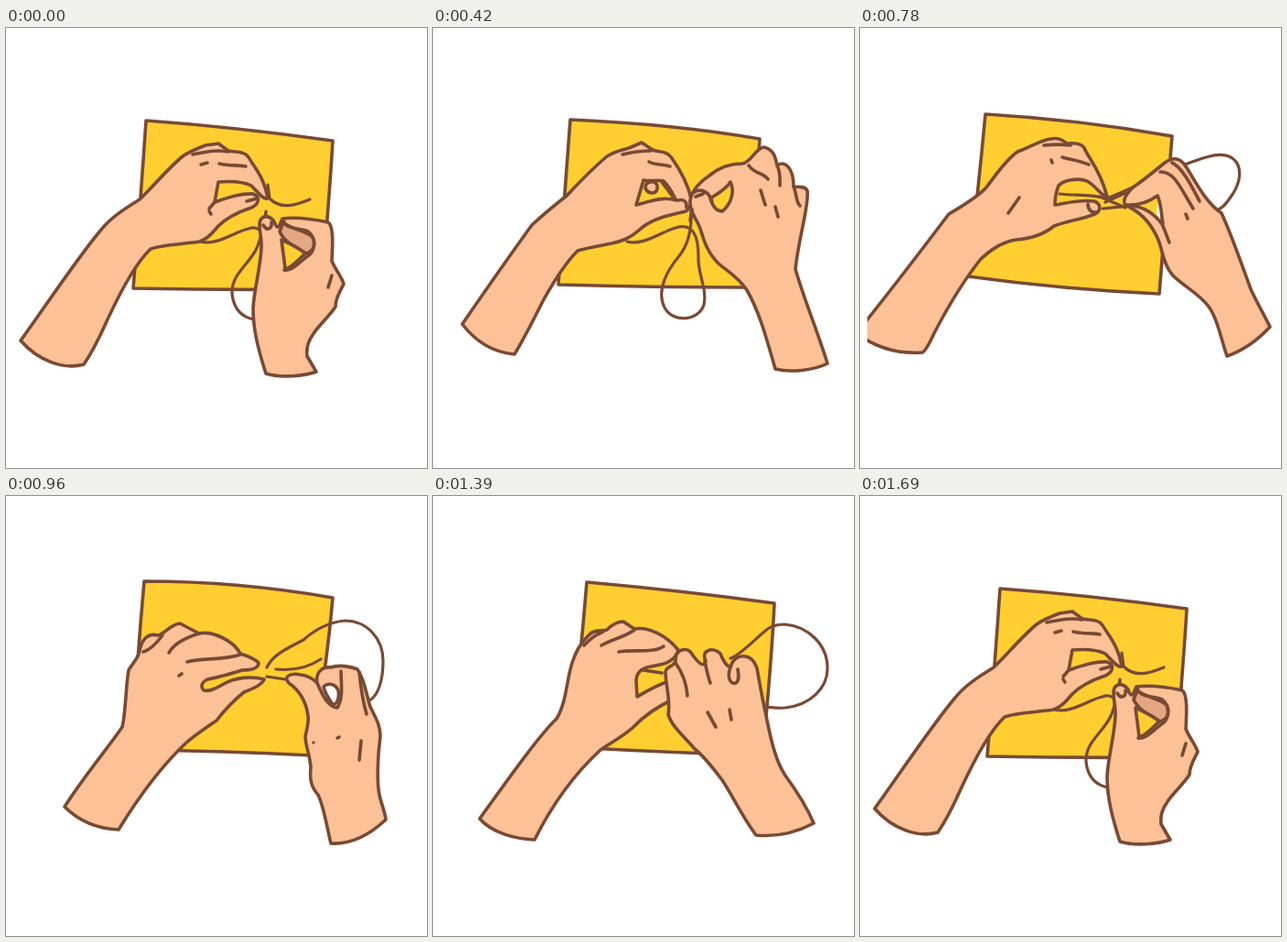
An HTML page without scripts that plays this animation: 460 by 480 pixels, repeating every 1750 ms.

```html
<!DOCTYPE html>
<html lang="en">
<head>
<meta charset="utf-8">
<title>Sewing hands</title>
<style>
  :root { --ink: #784a35; --skin: #fcc196; --card: #ffce31; }
  html, body { margin: 0; width: 100%; height: 100%; overflow: hidden; background: #fff; }
  svg { display: block; width: 100%; height: 100%; clip-path: inset(0 0 0 1.74%); }
  path { fill: none; stroke: var(--ink); stroke-width: 3.6; stroke-linecap: round; stroke-linejoin: round; }
  .skin { fill: var(--skin); }
  .gap { fill: var(--card); }
  .hole { fill: #fff; }
  .shade { fill: #e5a683; }
  .thin { stroke-width: 3.2; }
  .bare { stroke: none; }

  .card, .thread, .left, .right, .p0, .p1, .p2, .p3, .p4, .p5 {
    animation: 1750ms linear infinite;
  }
  .card { fill: var(--card); animation-name: card; }
  .thread { animation-name: thread; }
  .left { animation-name: left; }
  .right { animation-name: right; }

  /* Each drawing of a hand has its own window of time */
  .p0, .p1, .p2, .p3, .p4, .p5 { animation-timing-function: step-end; visibility: hidden; }
  .p0 { animation-name: p0; }
  .p1 { animation-name: p1; }
  .p2 { animation-name: p2; }
  .p3 { animation-name: p3; }
  .p4 { animation-name: p4; }
  .p5 { animation-name: p5; }
  @keyframes p0 { 0%, 96.57%, 100% { visibility: visible } 13.7% { visibility: hidden } }
  @keyframes p1 { 0%, 30.85%, 100% { visibility: hidden } 13.7% { visibility: visible } }
  @keyframes p2 { 0%, 51.42%, 100% { visibility: hidden } 30.85% { visibility: visible } }
  @keyframes p3 { 0%, 68.57%, 100% { visibility: hidden } 51.42% { visibility: visible } }
  @keyframes p4 { 0%, 86.28%, 100% { visibility: hidden } 68.57% { visibility: visible } }
  @keyframes p5 { 0%, 96.57%, 100% { visibility: hidden } 86.28% { visibility: visible } }

  /* The drawings inside undo the offset of their own pose */
  @keyframes left {
    0% { transform: none; animation-timing-function: steps(7) }
    24% { transform: translate(5px, -5px); animation-timing-function: step-end }
    30.85%, 44.57% { transform: translate(-14px, -8px); animation-timing-function: steps(3) }
    54.85% { transform: translate(10px, 0); animation-timing-function: steps(7) }
    79.42% { transform: translate(2px, 5px); animation-timing-function: steps(3) }
    89.71% { transform: translate(0, 10px); animation-timing-function: step-end }
    96.57%, 100% { transform: none }
  }
  @keyframes right {
    0% { transform: none; animation-timing-function: steps(7) }
    24% { transform: translate(30px, -20px); animation-timing-function: step-end }
    30.85% { transform: translate(50px, -121px); animation-timing-function: step-end }
    34.28% { transform: translate(50px, -121px); animation-timing-function: steps(3) }
    44.57% { transform: translate(50px, -30px); animation-timing-function: steps(3) }
    54.85% { transform: translate(50px, -15px); animation-timing-function: steps(7) }
    79.42% { transform: translate(20px, -25px); animation-timing-function: steps(3) }
    89.71% { transform: translate(0, -10px); animation-timing-function: step-end }
    93.14% { transform: translate(-3px, 71px); animation-timing-function: step-end }
    96.57%, 100% { transform: none }
  }
  @keyframes card {
    0% { d: path("M153,101 Q250,108 357,123 Q355,160 345,285 Q240,286 139,284 Q147,190 153,101 Z"); animation-timing-function: steps(7) }
    24% { d: path("M150,100 Q265,105 357,121 Q355,150 346,283 Q240,283 137,280 Q143,190 150,100 Z"); animation-timing-function: step-end }
    30.85%, 44.57% { d: path("M137,94 Q240,100 341,118 Q334,200 327,290 Q220,285 118,271 Q129,180 137,94 Z"); animation-timing-function: steps(3) }
    54.85% { d: path("M151,93 Q255,93 357,111 Q350,190 334,283 Q240,278 138,277 Q143,180 151,93 Z"); animation-timing-function: steps(7) }
    79.42% { d: path("M168,94 Q270,103 373,117 Q370,180 360,283 Q260,280 150,274 Q161,180 168,94 Z"); animation-timing-function: steps(3) }
    89.71% { d: path("M165,100 Q265,112 366,129 Q360,210 358,284 Q250,287 150,285 Q155,180 165,100 Z"); animation-timing-function: step-end }
    96.57%, 100% { d: path("M153,101 Q250,108 357,123 Q355,160 345,285 Q240,286 139,284 Q147,190 153,101 Z") }
  }
  @keyframes thread {
    0% { d: path("M212,233 C230,238 250,222 265,219 C276,214 290,228 292,250 C292,275 292,300 285,315 C275,322 250,318 247,290 C246,268 266,258 274,240 C280,228 280,215 284,202"); animation-timing-function: steps(7) }
    24% { d: path("M212,233 C230,238 250,222 265,218 C285,212 290,228 290,250 C289,268 300,285 296,302 C290,320 262,322 253,305 C243,285 258,262 268,250 C278,238 283,222 282,200"); animation-timing-function: step-end }
    30.85%, 34.28% { d: path("M270,186 C275,165 282,135 290,110 C295,102 300,100 310,95 C318,92 325,90 330,88 C335,88 340,90 345,92 C350,95 355,100 360,105 C362,106 364,106 366,106"); animation-timing-function: steps(3) }
    44.57% { d: path("M270,186 C285,180 320,164 335,156 C350,150 358,148 366,145 C385,138 402,134 411,146 C418,156 414,170 408,180 C400,192 396,198 385,200 C384,200 382,200 380,200"); animation-timing-function: steps(3) }
    54.85% { d: path("M285,187 C292,172 310,165 325,157 C335,148 350,138 370,136 C395,136 412,156 412,180 C412,200 407,218 397,223 C390,228 385,228 380,228 C380,228 380,228 380,228"); animation-timing-function: steps(7) }
    79.42% { d: path("M325,177 C335,174 350,158 362,148 C366,144 374,140 384,140 C410,142 431,162 431,188 C431,210 412,228 385,231 C375,232 368,230 360,230 C360,230 360,230 360,230"); animation-timing-function: steps(3) }
    89.71% { d: path("M290,192 C296,182 308,180 325,175 C340,170 350,162 364,156 C385,148 403,165 403,190 C403,215 388,235 365,235 C355,235 348,234 338,232 C338,232 338,232 338,232"); animation-timing-function: step-end }
    93.14% { d: path("M290,192 C300,198 300,215 296,230 C292,245 280,260 270,270 C262,280 258,288 258,296 C258,297 258,298 258,299 C258,300 258,301 258,302 C258,303 258,304 258,305"); animation-timing-function: step-end }
    96.57%, 100% { d: path("M212,233 C230,238 250,222 265,219 C276,214 290,228 292,250 C292,275 292,300 285,315 C275,322 250,318 247,290 C246,268 266,258 274,240 C280,228 280,215 284,202") }
  }
</style>
</head>
<body>
<svg viewBox="0 0 460 480">
  <path class="card"/>
  <path class="thread thin"/>

  <g class="left">
    <g class="p0">
      <path class="skin" d="M16,341 C40,308 80,248 104,220 C116,205 132,196 146,187 C160,174 176,154 193,140 C200,135 210,131 218,128 L232,126 L243,134 C252,136 260,134 265,141 C270,150 282,162 286,186 C282,188 276,180 268,172 C258,167 245,167 232,168 L228,190 C240,186 255,180 270,181 C278,184 277,192 268,196 C250,202 240,208 232,216 C222,228 215,234 204,234 C188,236 168,237 158,241 C140,258 122,294 110,320 C102,338 94,354 85,367 C64,373 36,364 16,341 Z"/>
      <path d="M204,138 C216,136 228,132 243,135 M233,148 C245,151 255,149 262,151 M213,149 L220,147 M222,200 L224,203 M228,190 L222,197 M263,189 L274,186"/>
    </g>
    <g class="p1" transform="translate(-5 5)">
      <path class="skin" d="M32,323 C52,294 84,248 108,215 C122,202 132,194 146,183 C160,168 176,152 190,140 C198,135 206,133 214,131 L228,125 L240,133 C248,136 256,134 261,142 C268,152 278,168 282,186 C284,190 280,198 276,200 C258,204 240,208 228,218 C215,230 205,233 195,235 C180,238 168,240 158,243 C145,256 130,280 120,298 C110,318 100,338 89,356 C68,354 48,344 32,323 Z"/>
      <path class="gap" d="M230,166 C238,168 245,165 252,167 C260,175 262,182 266,188 C250,183 236,190 222,193 Z"/>
      <path class="skin" d="M232,175 C236,182 246,182 245,172 C243,166 232,166 232,175 Z"/>
      <path d="M207,138 C215,136 225,134 238,134 M236,146 C244,150 250,148 259,151 M250,168 L262,184 M268,188 C274,186 278,190 277,196"/>
    </g>
    <g class="p2" transform="translate(14 8)">
      <path class="skin" d="M-4,333 C30,291 72,236 97,203 C112,194 128,185 138,174 C150,158 160,144 172,135 C184,131 198,122 208,121 C218,119 222,123 226,126 C236,125 244,126 246,133 C250,142 263,156 270,184 C264,184 258,172 248,167 C238,163 222,166 217,172 C214,179 213,186 213,193 C226,191 240,187 256,189 C264,192 264,201 254,204 C240,209 225,211 212,216 C200,226 184,230 170,231 C154,234 143,242 132,252 C112,277 94,308 81,333 C76,344 72,352 68,354 C40,356 15,347 -4,333 Z"/>
      <path d="M201,128 C210,127 222,127 230,128 M221,141 C232,144 240,145 250,149 M209,144 L210,147 M174,185 L162,202 M249,192 C249,198 253,202 258,201"/>
    </g>
    <g class="p3" transform="translate(-10 0)">
      <path class="skin" d="M64,339 C85,306 112,274 127,252 C131,235 131,205 134,190 C138,182 146,176 146,168 C150,152 158,150 166,152 C174,150 180,140 190,139 L211,150 C225,147 248,157 256,172 C262,174 270,176 276,182 C276,188 268,190 258,190 C245,194 232,198 220,200 C214,203 212,208 216,212 C224,214 232,208 238,205 C250,198 268,196 282,200 C280,206 270,210 260,214 C250,222 240,232 230,245 C215,255 205,262 196,270 C175,290 150,320 123,364 C100,363 80,355 64,339 Z"/>
      <path d="M171,152 C165,160 158,168 150,170 M211,150 C198,154 184,160 178,171 M198,181 C215,176 235,180 256,173 M189,196 L192,194"/>
    </g>
    <g class="p4" transform="translate(-2 -5)">
      <path class="skin" d="M51,352 C80,312 115,262 135,243 C146,225 146,200 152,182 C156,170 160,162 170,152 C176,145 184,148 190,146 C196,140 202,137 208,137 L220,145 C235,142 255,152 268,168 C264,182 250,184 238,186 C226,188 222,194 222,202 L223,219 C235,212 245,206 258,202 L262,222 C245,230 232,238 219,252 C207,263 194,269 183,277 C159,299 134,329 111,375 C90,374 65,368 51,352 Z"/>
      <path d="M165,163 C172,156 176,152 186,148 M184,163 C198,155 210,154 220,146 M203,170 C220,167 240,172 252,164 M230,190 L250,193"/>
    </g>
    <g class="p5" transform="translate(0 -10)">
      <path class="skin" d="M53,348 C75,316 100,285 117,265 C130,258 136,245 138,236 C143,220 142,205 143,195 C145,180 152,176 156,167 C160,155 168,150 176,154 C186,152 195,143 204,145 L214,153 C226,150 238,158 246,170 C258,176 272,184 280,193 C270,198 262,198 257,206 L252,222 C240,230 225,244 210,257 C190,274 172,291 158,306 C142,326 130,352 111,374 C90,378 68,366 53,348 Z"/>
      <path class="gap" d="M212,204 C228,203 240,193 259,196 L254,206 C244,212 224,216 212,204 Z"/>
      <path d="M164,165 C168,160 172,156 180,153 M176,165 C190,156 202,158 214,153 M197,172 C215,168 232,170 246,170 M166,180 L167,184 M208,218 L205,230"/>
    </g>
  </g>

  <!-- needle and loose thread ends -->
  <path class="p0 thin" d="M286,171 L288,186 C300,198 315,194 332,187 M284,200 L283,208"/>
  <path class="p2 thin" d="M218,181 C235,183 255,181 268,186 M265,197 C280,196 290,194 300,193 M262,184 L290,196 M268,190 L290,180"/>
  <path class="p3 thin" d="M295,189 C315,191 332,186 344,178 M285,197 L305,200"/>
  <path class="p5 thin" d="M300,204 C315,197 328,197 344,192"/>

  <g class="right">
    <g class="p0">
      <path class="skin" d="M284,377 C276,352 270,330 270,306 C271,285 278,262 279,240 C280,228 274,214 279,208 C284,203 292,207 294,214 C298,222 300,212 302,208 C318,206 338,209 352,212 C358,216 357,236 356,254 C360,264 366,270 369,279 C366,286 360,294 360,304 C353,315 340,326 335,335 C330,342 328,350 329,358 L339,375 C325,380 300,382 284,377 Z"/>
      <path class="shade" d="M303,212 C312,220 326,220 335,228 C339,236 336,244 328,246 C318,240 304,234 299,222 Z"/>
      <path class="gap" d="M301,231 C310,235 320,240 327,246 C320,252 312,262 305,263 C304,252 302,240 301,231 Z"/>
      <path d="M303,210 C306,220 320,218 330,222 C340,230 338,245 328,250 C320,256 312,266 304,264 M281,215 C285,222 291,219 290,212 M356,270 L352,283"/>
    </g>
    <g class="p1" transform="translate(-30 20)">
      <path class="skin" d="M374,372 C366,345 358,312 343,286 C334,272 320,264 312,257 C300,245 296,232 293,222 C290,210 280,202 281,188 C283,176 294,166 302,161 C314,151 326,148 338,148 C348,146 352,132 361,130 C372,132 374,140 376,150 C384,144 394,152 394,173 C400,173 408,173 409,178 C411,195 400,225 396,263 C405,295 420,330 431,366 C415,374 390,376 374,372 Z"/>
      <path class="gap" d="M303,186 C312,180 320,176 325,168 C330,178 326,192 316,200 C310,200 306,196 303,186 Z"/>
      <path d="M284,180 C292,174 302,178 305,190 M287,184 L295,181 M345,150 C352,160 360,157 366,165 M376,150 C380,158 379,164 379,172 M394,173 C398,182 396,189 401,194 M358,177 L363,193 M374,195 L377,206 M283,198 L281,210"/>
    </g>
    <g class="p2" transform="translate(-50 30)">
      <path class="skin" d="M401,358 C394,338 391,318 381,304 C370,289 352,281 341,269 C329,254 331,238 323,225 C316,211 305,200 290,193 C286,188 291,181 298,174 C310,166 322,156 333,147 C343,140 350,142 356,151 C366,166 377,190 395,202 C407,228 417,258 427,285 C434,300 441,312 448,326 C435,340 418,352 401,358 Z"/>
      <path class="gap bare" d="M304,194 C314,192 320,187 325,184 L329,192 L330,212 C322,202 314,197 304,194 Z"/>
      <path class="hole bare" d="M325,192 L329,193 L330,211 L324,203 Z"/>
      <path d="M290,193 C306,194 318,188 325,183 M298,194 C314,196 324,206 330,214 C333,220 335,227 338,234 M325,183 C329,190 329,202 331,214 M328,157 C343,156 350,174 364,197 M341,147 C352,152 362,172 371,189 M356,203 L358,208"/>
    </g>
    <g class="p3" transform="translate(-50 15)">
      <path class="skin" d="M355,379 C350,358 347,338 341,326 C332,316 332,306 333,296 C332,282 327,272 327,262 C329,254 331,248 330,240 C328,222 318,210 309,204 C302,196 312,193 322,195 C330,196 336,200 340,204 C338,192 346,186 354,187 C364,184 376,186 384,189 C392,200 394,218 398,230 C404,242 409,250 409,262 C406,284 405,312 408,326 C410,336 414,344 415,353 C395,372 375,380 355,379 Z"/>
      <path class="hole" d="M347,208 C352,203 360,205 363,212 C365,222 360,230 356,226 C352,220 348,214 347,208 Z"/>
      <path d="M340,204 C346,218 352,230 362,231 C369,220 366,204 366,191 M386,192 C388,212 390,225 394,238 M336,269 L336,269 M362,264 L364,263 M388,267 L386,288"/>
    </g>
    <g class="p4" transform="translate(-20 25)">
      <path class="skin" d="M353,370 C338,350 328,328 316,310 C304,294 296,284 286,276 C272,260 260,250 257,238 C260,224 254,206 254,192 C254,186 264,186 265,180 C264,168 278,162 284,174 C290,182 296,188 298,180 C292,168 306,164 314,172 C318,182 324,190 326,184 C330,172 348,170 354,188 C357,205 360,222 364,240 C370,270 375,290 385,305 C396,320 408,338 416,357 C395,368 372,372 353,370 Z"/>
      <path d="M265,182 C272,192 277,204 278,218 M297,180 C299,190 300,196 303,204 M326,184 C320,198 325,206 331,204 C335,201 334,195 333,189 M300,236 L309,252 M324,233 L326,244"/>
    </g>
    <g class="p5" transform="translate(0 10)">
      <path class="skin" d="M313,383 C306,360 296,342 284,330 C270,318 260,306 259,292 C254,272 252,252 254,234 C252,226 240,218 238,209 C242,206 252,210 257,206 C256,196 268,195 278,197 C290,196 300,198 304,200 C314,198 322,202 328,207 C338,215 340,236 342,256 C346,276 343,292 345,306 C354,328 366,348 373,371 C355,380 335,384 313,383 Z"/>
      <path d="M241,209 C258,213 274,210 280,220 C287,235 285,250 286,262 M299,200 C305,215 308,228 310,245 M318,203 C325,220 330,235 331,244 M259,231 L258,282 M309,265 L310,271 M279,283 L286,293"/>
    </g>
  </g>
</svg>
</body>
</html>
```
